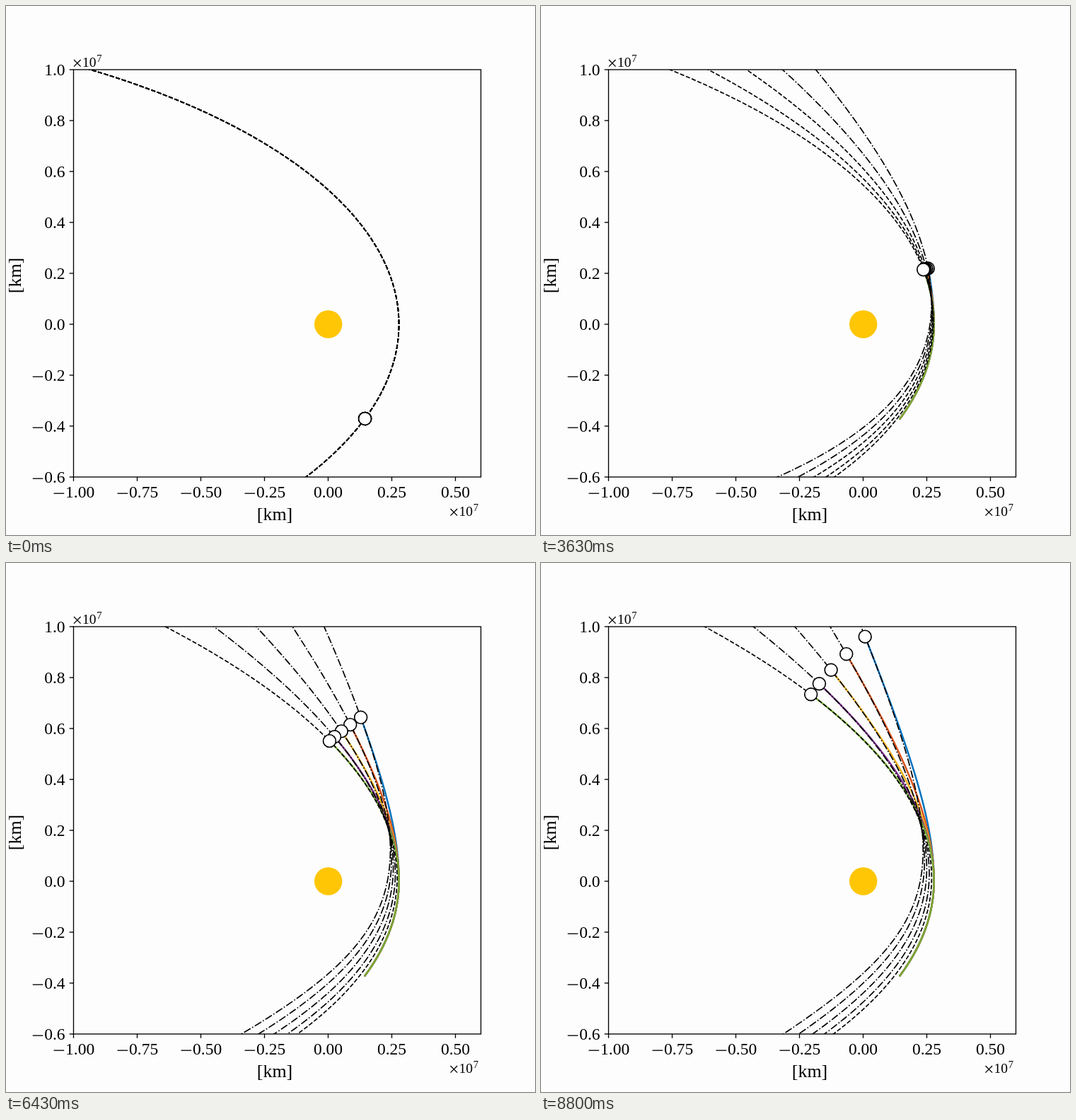
Animation, 748 px wide and 748 px high, one loop 8.83 s. Source, as an HTML page:

```html
<!DOCTYPE html>
<html lang="en">
<head>
<meta charset="utf-8">
<title>Orbits</title>
<style>
  html, body { margin: 0; width: 100%; height: 100%; overflow: hidden; background: #fdfdfd; }
  svg { display: block; width: 748px; height: 748px; }
  text { font-family: "Liberation Serif", "Times New Roman", serif; fill: #000; }
  .thin { fill: none; stroke: #000; stroke-width: 1.33; }
</style>
</head>
<body>
<svg id="stage" viewBox="0 0 748 748">
  <clipPath id="frame"><rect x="95.5" y="90" width="576" height="576"/></clipPath>
  <circle cx="455.7" cy="450" r="19.7" fill="#fec605"/>
  <g id="plot" clip-path="url(#frame)"></g>
  <rect class="thin" x="95.5" y="90" width="576" height="576"/>
  <g id="axes"></g>
  <g id="craft"></g>
</svg>
<script>
const LOOP = 8830, LAST = 264;
const SUN = { x: 455.6, y: 450 };
const P = 190;          // semi-latus rectum, px
const ECC = 0.9;        // eccentricity before the sails open
const H = 216.8;        // angular momentum, px² per step
const START = -68.72 * Math.PI / 180;
const COLORS = ["#0072bd", "#d95319", "#edb120", "#7e2f8e", "#77ac30"];
const DASHED = "6.17 2.67", DASHDOT = "10.67 2.67 1.67 2.67";

const byId = id => document.getElementById(id);

function add(parent, tag, attrs, content) {
  const el = document.createElementNS("http://www.w3.org/2000/svg", tag);
  for (const key in attrs) el.setAttribute(key, attrs[key]);
  if (content) el.textContent = content;
  parent.appendChild(el);
  return el;
}

const polar = (r, a) => [SUN.x + r * Math.cos(a), SUN.y - r * Math.sin(a)];
const toPath = pts => "M" + pts.map(p => p[0].toFixed(2) + " " + p[1].toFixed(2)).join("L");

// ---- Axes ----
const axes = byId("axes");

function label(x, y, value, digits, anchor) {
  const size = 23.5, num = Math.abs(value).toFixed(digits);
  const numWidth = (digits + 1.27) * size / 2 + size * 0.12;
  const minus = value < 0 ? size * 0.778 : 0;
  const left = anchor === "end" ? x - numWidth - minus : x - (numWidth + minus) / 2;
  add(axes, "text", { x: left + minus, y, "font-size": size }, num);
  if (minus) add(axes, "path", { class: "thin", d: `M${left + 1.8} ${y - 5.8}h14.6` });
}

function power(x, y) {
  add(axes, "path", { class: "thin", d: `M${x} ${y - 10}l9.6 9.6m0 -9.6l-9.6 9.6` });
  add(axes, "text", { x: x + 12, y, "font-size": 19.5 }, "10");
  add(axes, "text", { x: x + 32.3, y: y - 7, "font-size": 14.5 }, "7");
}

for (let i = 0; i < 7; i++) {
  const x = 95.5 + 90 * i;
  add(axes, "path", { class: "thin", d: `M${x} 666v5.8` });
  label(x, 695, (i - 4) / 4, 2, "middle");
}
for (let i = 0; i < 9; i++) {
  const y = 90 + 72 * i;
  add(axes, "path", { class: "thin", d: `M95.5 ${y}h-5.8` });
  label(83.7, y + 8, (5 - i) / 5, 1, "end");
}
power(96, 86);
power(628.5, 721);
const unit = { "text-anchor": "middle", "font-size": 26 };
add(axes, "text", { ...unit, x: 380, y: 727 }, "[km]");
add(axes, "text", { ...unit, transform: "translate(20.5 381) rotate(-90)" }, "[km]");

// ---- Sails: outward push of lightness beta once past periapsis ----
function radius(a, beta) {
  const c = Math.cos(a), push = a > 0 ? beta : 0;
  return P / ((1 - push) * (1 - c) + (1 + ECC) * c);
}

function flight(beta) {
  const sub = 20, dt = 1 / sub, rate = a => H / radius(a, beta) ** 2;
  const angles = [START];
  let a = START;
  for (let k = 0; k < LAST; k++) {
    for (let i = 0; i < sub; i++) a += dt * rate(a + dt / 2 * rate(a));
    angles.push(a);
  }
  return angles;
}

// Conic the craft would follow if the push stopped at angle a
function orbit(a, beta) {
  const b = Math.max(a, 0);
  const ex = ECC + beta * (1 - Math.cos(b)), ey = -beta * Math.sin(b);
  const e = Math.hypot(ex, ey), axis = Math.atan2(ey, ex);
  const limit = Math.acos((P / 900 - 1) / e), pts = [];
  for (let i = 0; i <= 240; i++) {
    const v = limit * (i / 120 - 1);
    pts.push(polar(P / (1 + e * Math.cos(v)), axis + v));
  }
  return { d: toPath(pts), dash: e > 1 ? DASHDOT : DASHED };
}

const plot = byId("plot"), craft = byId("craft");
const trails = add(plot, "g", { fill: "none", "stroke-width": 2.5, "stroke-linejoin": "round", "stroke-linecap": "square" });
const conics = add(plot, "g", { fill: "none", stroke: "#000", "stroke-width": 1.67 });

const sails = COLORS.map((color, i) => {
  const beta = 0.0128 * (6 - i) ** 2;
  const angles = flight(beta);
  return {
    beta, angles,
    points: angles.map(a => polar(radius(a, beta), a)),
    trail: add(trails, "path", { stroke: color }),
    conic: add(conics, "path", {}),
    dot: add(craft, "circle", { r: 8.9, fill: "#fff", stroke: "#000", "stroke-width": 1.67 })
  };
});

function draw(step) {
  for (const s of sails) {
    const { d, dash } = orbit(s.angles[step], s.beta);
    s.conic.setAttribute("d", d);
    s.conic.setAttribute("stroke-dasharray", dash);
    s.trail.setAttribute("d", step ? toPath(s.points.slice(0, step + 1)) : "");
    s.dot.setAttribute("cx", s.points[step][0]);
    s.dot.setAttribute("cy", s.points[step][1]);
  }
}

// 30 steps a second, held on a 10 ms grid
let begin = null, shown = -1;
function tick(now) {
  if (begin === null) begin = now;
  const t = Math.floor(((now - begin) % LOOP) / 10) * 10;
  const step = Math.min(LAST, Math.floor((t + 3.4) * 0.03));
  if (step !== shown) draw(shown = step);
  requestAnimationFrame(tick);
}
draw(0);
requestAnimationFrame(tick);
</script>
</body>
</html>
```
